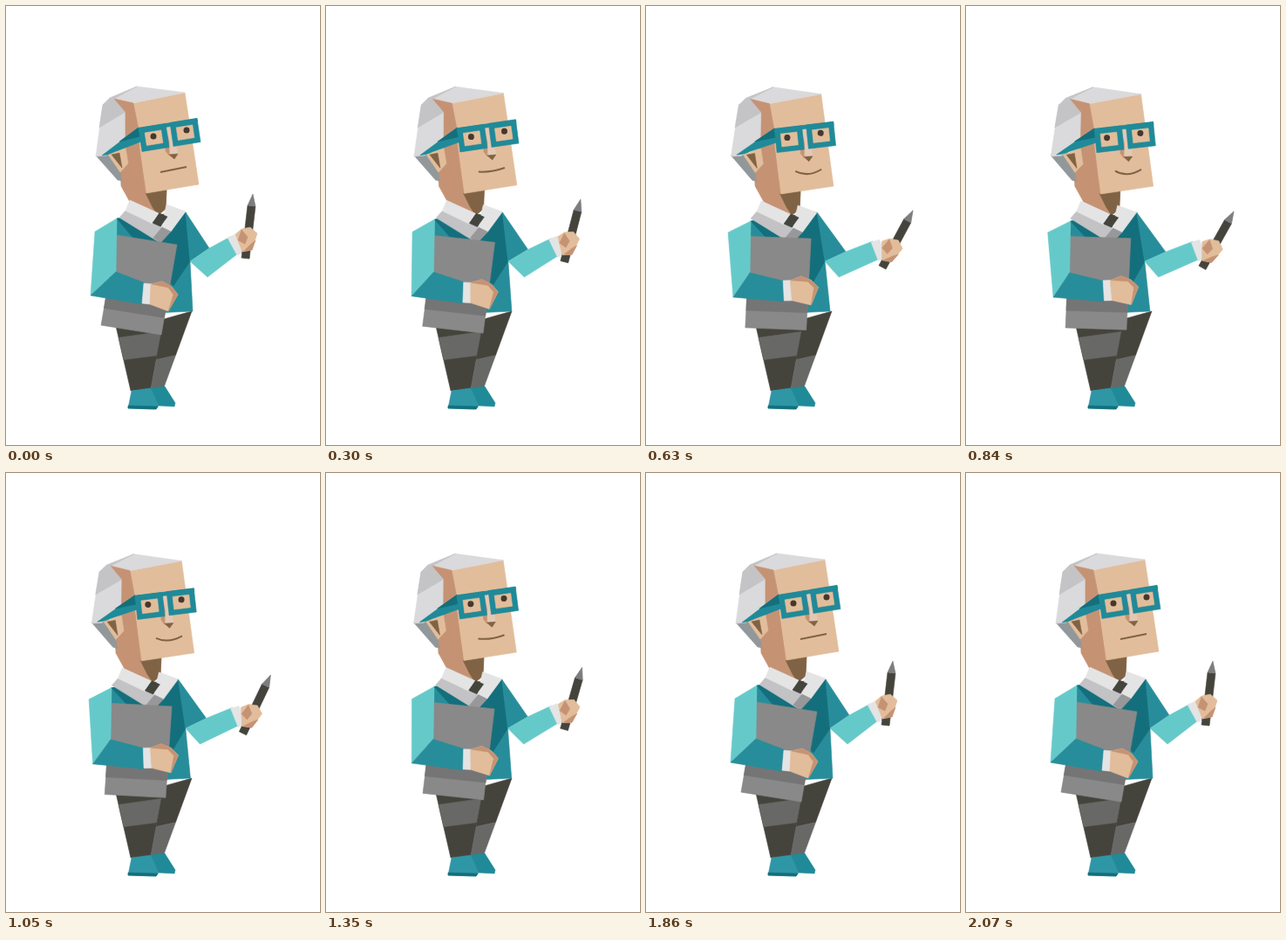
An HTML page for the animation above (3 s loop, 360x502 px).

```html
<!DOCTYPE html>
<html lang="en">
<head>
<meta charset="utf-8">
<title>Teacher with a pen</title>
<style>
html, body { margin: 0; width: 100%; height: 100%; overflow: hidden; background: #fff; }
svg { display: block; width: 360px; height: 502px; }
</style>
</head>
<body>
<svg viewBox="0 0 360 502"></svg>
<script>
const LOOP = 3000, STEP = 30, PEAK = 750, REST = 1830, REACH = 1.05;
const NS = "http://www.w3.org/2000/svg";
const svg = document.querySelector("svg");

const C = {
  light: "#66c9c9", mid: "#288d9a", deep: "#146f7c", glass: "#208a98", shoe: "#2f96a5",
  skin: "#e2bd9b", side: "#c59374", shade: "#806344", pale: "#e3c8b5", eye: "#46382f",
  hair: "#dad9db", hairDark: "#c4c3c6", nape: "#92989a",
  white: "#e4e4e5", strip: "#c3c2c4", knot: "#98989a", book: "#898989", bookShade: "#757575",
  plaid: "#686867", dark: "#45443c", tip: "#7d7d7f"
};

const movers = [];

function add(parent, tag, attrs) {
  const el = document.createElementNS(NS, tag);
  for (const key in attrs) el.setAttribute(key, attrs[key]);
  return parent.appendChild(el);
}

// A thin stroke in the fill colour closes seams between neighbours.
function facet(parent, color, points) {
  return add(parent, "polygon", {
    points, fill: C[color], stroke: C[color], "stroke-width": 0.6, "stroke-linejoin": "round"
  });
}

// Rigid group that shifts and turns about a pivot as the figure leans.
function rig(parent, dx, dy, turn = 0, px = 0, py = 0) {
  const g = add(parent, "g", {});
  movers.push(k => g.setAttribute("transform",
    `translate(${dx * k} ${dy * k}) rotate(${turn * k} ${px} ${py})`));
  return g;
}

// Patch of a parallelogram: origin o, sides u and v, cut to a fraction of each.
function slab(parent, color, o, u, v, [u0, u1] = [0, 1], [v0, v1] = [0, 1]) {
  const at = (a, b) => [o[0] + u[0] * a + v[0] * b, o[1] + u[1] * a + v[1] * b];
  facet(parent, color, [at(u0, v0), at(u1, v0), at(u1, v1), at(u0, v1)].join(" "));
}

// Joints: resting x, y and how far each one travels.
const joints = {
  shoulderL: [127, 243, -7, 3], outer: [102, 258, -8, 1], elbowL: [97, 331, 3, 2],
  inner: [126, 304, -7, 1], wristTop: [160, 317, 0, -2], wristLow: [156, 341, 2, -3],
  shoulderR: [206, 236, -10, 0], armpit: [211, 292, -6, 0], crook: [233, 277, -4, 4],
  cuffTop: [257, 264, 3, 5], cuffLow: [266, 283, 2, 6], elbowR: [231, 310, -10, 0],
  rib: [192, 320, -3, 0], hip: [214, 349, -3, 0], waist: [150, 352, 0, 0]
};

function limb(color, names) {
  const el = facet(svg, color, "");
  const chain = names.split(" ").map(name => joints[name]);
  movers.push(k => el.setAttribute("points",
    chain.map(([x, y, dx, dy]) => [x + dx * k, y + dy * k]).join(" ")));
}

function legs() {
  const edge = (x0, y0, x1, y1) => f => [x0 + (x1 - x0) * f, y0 + (y1 - y0) * f];
  const left = edge(126, 366, 143, 440);
  const seam = edge(181, 358, 166, 438);
  const right = edge(213, 349, 181, 436);
  const check = (color, a, b, from, to) =>
    facet(svg, color, [a(from), b(from), b(to), a(to)].join(" "));
  check("dark", left, seam, 0, 1);
  check("plaid", left, seam, 0.18, 0.52);
  check("dark", seam, right, 0, 0.58);
  check("plaid", seam, right, 0.58, 1);
  facet(svg, "shoe", "144,440 166,437 175,457 172,461 140,460");
  facet(svg, "glass", "166,437 182,435 194,454 193,458 175,457");
  facet(svg, "deep", "140,457 174,458 172,461 140,460");
}

function neck() {
  const g = rig(svg, -7, 0);
  facet(g, "side", "131,186 162,200 184,210 183,232 174,240 142,224 132,206");
  facet(g, "shade", "160,214 184,210 183,232 174,239 168,230");
}

function farArm() {
  limb("mid", "shoulderR crook armpit");
  limb("light", "armpit crook cuffTop cuffLow elbowR");
  slab(rig(svg, 3, 6, 8, 262, 273), "white", [254, 265], [9, -4], [11, 20]);
  const hand = rig(svg, 3, 10, 22, 270, 272);
  slab(hand, "dark", [277, 228], [9, 1], [-7, 60]);
  facet(hand, "tip", "283,215 286,229 277,228");
  facet(hand, "skin", "263,261 270,255 280,253 288,260 282,279 271,281");
  facet(hand, "side", "270,256 277,264 274,272 266,268");
  facet(hand, "side", "281,272 286,268 282,279 273,280");
}

function collar() {
  const g = rig(svg, -10, 1);
  facet(g, "strip", "137,234 168,248 179,253 177,271 130,242");
  facet(g, "white", "142,222 175,237 168,249 137,234");
  facet(g, "white", "184,227 206,235 189,258 178,253");
  facet(g, "knot", "179,253 189,258 177,271 169,265");
  slab(g, "dark", [176, 237], [9, 4], [-8, 11]);
}

function folder() {
  const g = rig(svg, -1, -2, -7, 152, 319);
  const patch = (color, from, to) =>
    slab(g, color, [127, 262], [69, 11], [-18, 103], [0, 1], [from, to]);
  patch("book", 0, 1);
  patch("bookShade", 0.68, 0.81);
}

function nearArm() {
  limb("light", "shoulderL outer elbowL inner");
  limb("mid", "elbowL inner wristTop wristLow");
  const hand = rig(svg, 1, -3, -8, 157, 330);
  slab(hand, "white", [158, 317], [9, 1], [-2, 23]);
  facet(hand, "skin", "166,318 179,315 190,321 197,330 186,349 165,341");
  facet(hand, "side", "167,318 179,315 190,321 197,330 186,349 192,330 186,322");
}

function head() {
  const g = rig(svg, -5.2, 0.8, 1, 150, 150);
  facet(g, "nape", "103,171 116,162 138,180 134,200 128,199");
  facet(g, "side", "126,108 146,111 152,150 161,214 133,199 131,186 137,148");
  facet(g, "skin", "146,111 205,99 221,204 161,214 152,150");
  facet(g, "hair", "111,113 137,121 137,150 115,171 103,172");
  facet(g, "hairDark", "111,113 124,106 137,121 107,139");
  facet(g, "hair", "150,92 205,99 146,111 124,106");
  facet(g, "hairDark", "150,92 124,106 111,113 119,105");
  facet(g, "side", "124,106 146,111 152,141 137,150 137,121");
  facet(g, "skin", "117,170 137,162 140,180 131,190");
  facet(g, "shade", "121,170 130,168 133,185");

  const mouth = add(g, "path", { fill: "none", stroke: C.shade, "stroke-width": 2 });
  movers.push(k => mouth.setAttribute("d",
    `M177 ${190 - 2.5 * k}Q${192 - k} ${187 + 8 * k} 207 ${184 + k}`));
  glasses(rig(g, 0, 1, 1.5, 185, 150));
}

function glasses(g) {
  const u = [31, -5], v = [4, 27];
  facet(g, "glass", "110,171 152,139 155,155 116,170");
  facet(g, "deep", "130,155 152,139 154,149");
  slab(g, "pale", [183, 139], [8, -1], [6, 31]);
  facet(g, "side", "183,140 187,155 187,171 183,166");
  facet(g, "shade", "187,170 197,169 193,175");
  slab(g, "glass", [152, 139.5], [67, -11], v, [0, 1], [0, 0.15]);
  for (const o of [[152, 139.5], [188, 133.5]]) {
    slab(g, "glass", o, u, v);
    slab(g, "skin", o, u, v, [0.2, 0.8], [0.24, 0.78]);
  }
  const eyes = rig(g, -2, 0);
  add(eyes, "circle", { cx: 169, cy: 149, r: 3.5, fill: C.eye });
  add(eyes, "circle", { cx: 207, cy: 142, r: 3.5, fill: C.eye });
}

legs();
neck();
limb("mid", "shoulderL shoulderR armpit hip waist inner");
limb("deep", "shoulderL shoulderR armpit rib");
farArm();
collar();
folder();
nearArm();
head();

const smooth = u => (1 - Math.cos(Math.PI * u)) / 2;

function lean(t) {
  if (t < PEAK) return smooth(t / PEAK);
  return t < REST ? 1 - smooth((t - PEAK) / (REST - PEAK)) : 0;
}

const start = performance.now();
function tick() {
  const t = (performance.now() - start) % LOOP;
  const k = REACH * lean(Math.floor(t / STEP) * STEP);
  for (const move of movers) move(k);
  requestAnimationFrame(tick);
}
tick();
</script>
</body>
</html>
```
